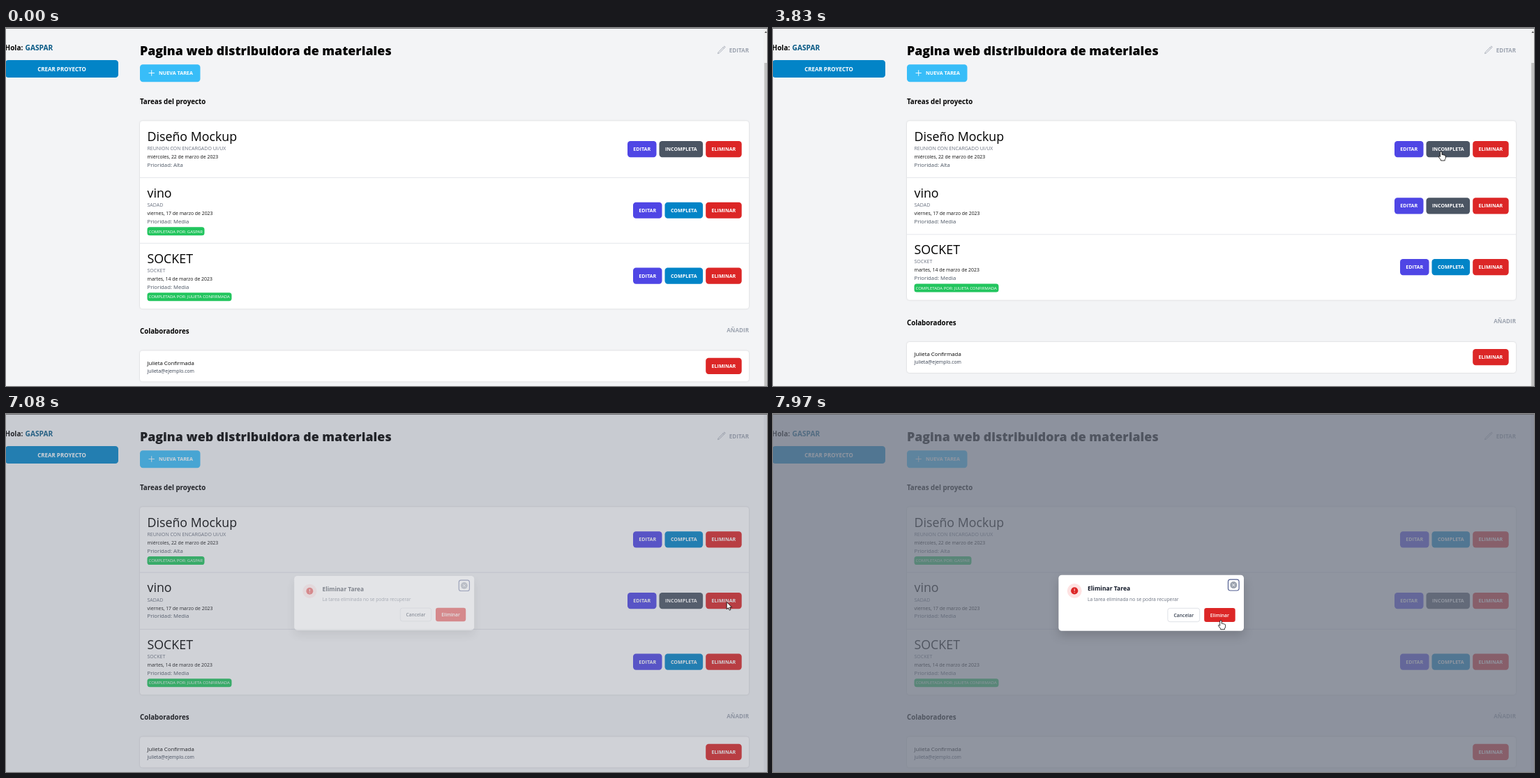
Write an HTML page that moves like this. It is 1091x513 px and loops after 8 s.

```html
<!DOCTYPE html>
<html lang="es">
<head>
<meta charset="utf-8">
<title>Tareas del proyecto</title>
<style>
html, body { margin: 0; height: 100%; overflow: hidden; background: #f3f4f6; }
svg { display: block; width: 100%; height: 100%; font-family: "Open Sans", "Noto Sans", sans-serif; }
.b { font-weight: 700; }
.mid { text-anchor: middle; }
.end { text-anchor: end; }
.card { filter: drop-shadow(0 .5px .8px rgba(0,0,0,.16)); }
#panel { filter: drop-shadow(0 7px 7px rgba(0,0,0,.16)); }
</style>
</head>
<body>
<svg viewBox="0 0 1091 513">
  <rect width="1091" height="513" fill="#f3f4f6"/>
  <g id="page"></g>
  <g id="list"></g>
  <rect x="1086.5" width="4.5" height="513" fill="#e7e9ec"/>
  <g id="scrollbar">
    <rect x="1086.5" width="4.5" height="513" fill="#f1f1f1"/>
    <rect x="1087.2" y="50" width="3.8" height="463" fill="#c1c1c1"/>
    <path d="M1087.5 7L1089.3 4.5L1091 7Z" fill="#505050"/>
  </g>
  <rect id="shade" width="1091" height="513" fill="#6b7280"/>
  <g id="modal"></g>
  <rect width="1091" height="1" fill="#6c6d70"/>
  <g id="cursor" fill="#fff" stroke="#000" stroke-width=".8" stroke-linejoin="round">
    <path id="arrow" d="M0 0V10.4L2.4 8.2L4 11.8L5.8 11L4.2 7.6H7.4Z"/>
    <path id="hand" d="M-1.3 1.2Q-1.3 0 0 0T1.3 1.2V4.6Q3 4.2 3.4 5Q5 4.8 5.3 5.6Q6.6 5.4 6.6 7V9Q6.6 10.5 5.5 11.5V13H-.3V12L-3.3 8Q-4 6.6-2.6 6.6L-1.3 7.6Z"/>
  </g>
</svg>
<script>
const LOOP = 8000, DIALOG_AT = 6880, FADE_AT = 7010;
const USER = 'GASPAR', HELPER = 'Julieta Confirmada';
const INDIGO = '#4f46e5', SKY = '#0284c7', SLATE = '#4b5563', RED = '#dc2626', PALE = '#9ca3af';
const $ = id => document.getElementById(id);

const text = (x, y, size, fill, str, cls = '', extra = '') =>
  `<text x="${x}" y="${y}" font-size="${size}" fill="${fill}" class="${cls}" ${extra}>${str}</text>`;
const rect = (x, y, w, h, r, fill, extra = '') =>
  `<rect x="${x}" y="${y}" width="${w}" height="${h}" rx="${r}" fill="${fill}" ${extra}/>`;

const tasks = [
  { name: 'Diseño Mockup', note: 'REUNION CON ENCARGADO UI/UX', date: 'miércoles, 22 de marzo de 2023', level: 'Alta', by: USER },
  { name: 'vino', note: 'SADAD', date: 'viernes, 17 de marzo de 2023', level: 'Media', by: USER },
  { name: 'SOCKET', note: 'SOCKET', date: 'martes, 14 de marzo de 2023', level: 'Media', by: HELPER.toUpperCase() }
];

let buttons = [];
function button(x, cy, w, fill, label) {
  const h = 23.2, y = cy - h / 2;
  buttons.push([x, y, w, h]);
  return rect(x, y, w, h, 4.2, fill) + text(x + w / 2, cy + 2.5, 7.1, '#fff', label, 'b mid');
}

function taskRow(task, y, h, done) {
  const cy = y + h / 2 - .2;
  return text(202.5, y + 28.3, 17.8, '#000', task.name) +
    text(202.5, y + 41.4, 7, '#6b7280', task.note) +
    text(202.5, y + 53.6, 6.88, '#111', task.date) +
    text(202.5, y + 65.3, 7.75, SLATE, 'Prioridad: ' + task.level) +
    (done ? rect(202.5, y + 70.8, task.by === USER ? 82 : 121, 12, 3.6, '#22c55e') +
      text(204.5, y + 79, 6, '#fff', 'COMPLETADA POR: ' + task.by) : '') +
    button(done ? 899 : 891, cy, 41.5, INDIGO, 'EDITAR') +
    (done ? button(944.5, cy, 54.6, SKY, 'COMPLETA') : button(936.5, cy, 62.6, SLATE, 'INCOMPLETA')) +
    button(1003.2, cy, 51.5, RED, 'ELIMINAR');
}

function drawList(state) {
  const top = 133.2;
  let y = top, rows = '';
  buttons = [];
  tasks.forEach((task, i) => {
    const done = state[i] === '1', h = done ? 93.9 : 81.3;
    rows += taskRow(task, y, h, done);
    y += h;
    if (i < 2) rows += rect(192, y - .5, 873, 1, 0, '#e5e7eb');
  });
  $('list').innerHTML = rect(192, top, 873, y - top, 4, '#fff', 'class="card"') + rows +
    text(192, y + 36, 9.75, '#000', 'Colaboradores', 'b') +
    text(1065, y + 33.6, 8.1, PALE, 'AÑADIR', 'b end') +
    rect(192, y + 60.3, 873, 44, 4, '#fff', 'class="card"') +
    text(202.5, y + 80.2, 7.8, '#000', HELPER) +
    text(202.5, y + 91.2, 6.9, '#374151', 'julieta@ejemplo.com') +
    button(1003.2, y + 82, 51.5, RED, 'ELIMINAR');
}

$('page').innerHTML =
  text(-1.5, 32.2, 10, '#000', 'Hola:', 'b') + text(27.5, 32.2, 10.2, '#075985', USER, 'b') +
  rect(-1, 45.9, 162, 25.2, 4.2, SKY) + text(80, 61.6, 8, '#fff', 'CREAR PROYECTO', 'b mid') +
  text(192, 39.4, 17.8, '#000', 'Pagina web distribuidora de materiales', '', 'font-weight="800"') +
  rect(192, 52.2, 86.5, 25, 4.2, '#38bdf8') +
  '<path d="M204.5 64.5h8.4M208.7 60.3v8.4" stroke="#fff" stroke-width=".9"/>' +
  text(219, 67.2, 7.2, '#fff', 'NUEVA TAREA', 'b') +
  text(192, 108.8, 9.75, '#000', 'Tareas del proyecto', 'b') +
  text(1065, 34.5, 8.1, PALE, 'EDITAR', 'b end') +
  `<path transform="translate(1019.4 25.3) scale(.52)" fill="none" stroke="${PALE}" stroke-width="1.6"
    d="M16.9 4.5L18.6 2.8a1.9 1.9 0 1 1 2.6 2.6L6.8 19.8a4.5 4.5 0 0 1-1.9 1.1l-2.7.8.8-2.7a4.5 4.5 0 0 1 1.1-1.9ZM16.9 4.5l2.6 2.6"/>`;

const confirmBox = [618, 278, 44.5, 20];
$('modal').innerHTML =
  rect(409.2, 230.8, 265.6, 80, 4.5, '#fff', 'id="panel"') +
  `<circle cx="432" cy="253.3" r="10.4" fill="#fee2e2"/><circle cx="432" cy="253.3" r="5.1" fill="${RED}"/>
   <path d="M432 250.4v3.4M432 255.1v1" stroke="#fff" stroke-width=".9"/>` +
  text(450.7, 253, 8.55, '#111827', 'Eliminar Tarea', 'b') +
  text(450.7, 267.5, 6.8, '#6b7280', 'La tarea eliminada no se podra recuperar') +
  rect(652.3, 237.2, 15.6, 15.8, 3.2, '#fff', 'stroke="#535f91" stroke-width="1.2"') +
  `<circle cx="660.1" cy="245.1" r="5" fill="${PALE}"/>
   <path d="M658.2 243.2l3.8 3.8M662 243.2l-3.8 3.8" stroke="#fff" stroke-width=".9"/>` +
  rect(565.7, 278.3, 45.8, 19.4, 3.2, '#fff', 'stroke="#d1d5db" stroke-width=".7"') +
  text(588.6, 290.7, 6.8, '#374151', 'Cancelar', 'mid', 'font-weight="600"') +
  rect(...confirmBox, 3.2, RED) +
  text(640.2, 290.7, 6.8, '#fff', 'Eliminar', 'mid', 'font-weight="600"');

// Pointer stops: time, x, y
const stops = [
  [130, 1066, 508], [560, 956, 300], [880, 967, 215], [950, 967, 215], [1020, 971, 196],
  [1220, 971, 196], [1430, 980, 248], [1570, 980, 248], [1700, 977.5, 262.5], [2590, 977.5, 262.5],
  [3360, 957.7, 177], [4100, 957.7, 177], [4400, 971, 190], [4850, 965.5, 190.5], [4910, 965.5, 190.5],
  [5520, 1011.3, 184], [6120, 1011.3, 184], [6680, 1033.2, 269.4], [7290, 1033.2, 269.4],
  [7620, 714, 313], [7690, 714, 313], [7970, 642, 295.7], [LOOP, 642, 295.7]
];

function pointerAt(t) {
  const i = Math.max(1, stops.findIndex(s => s[0] > t));
  const [t0, x0, y0] = stops[i - 1], [t1, x1, y1] = stops[i];
  const p = Math.max(0, (t - t0) / (t1 - t0)), e = p * p * (3 - 2 * p);
  return [x0 + (x1 - x0) * e, y0 + (y1 - y0) * e];
}

const show = (id, on) => $(id).setAttribute('visibility', on ? 'visible' : 'hidden');

let shown;
function render(t) {
  const state = t < 2590 ? '011' : t < 3900 ? '001' : '101';
  if (state !== shown) drawList(shown = state);

  // The dialog fades in by steps of 70 ms
  const p = (70 * Math.floor((t - FADE_AT) / 70) - 10) / 300;
  const fade = 1 - (1 - Math.min(1, Math.max(0, p))) ** 2.45;
  const k = .95 + .05 * fade;
  $('shade').setAttribute('opacity', .75 * fade);
  $('modal').setAttribute('opacity', fade);
  $('modal').setAttribute('transform', `translate(542.2 270.8) scale(${k}) translate(-542 -270.8)`);
  show('scrollbar', t < FADE_AT);

  const [x, y] = pointerAt(t);
  const targets = t < DIALOG_AT ? buttons : [confirmBox];
  const over = targets.some(([bx, by, w, h]) => x >= bx && x <= bx + w && y >= by && y <= by + h);
  $('cursor').setAttribute('transform', `translate(${x} ${y})`);
  show('arrow', t >= 130 && !over);
  show('hand', t >= 130 && over);
}

const start = performance.now();
function tick() {
  render((performance.now() - start) % LOOP);
  requestAnimationFrame(tick);
}
tick();
</script>
</body>
</html>
```
